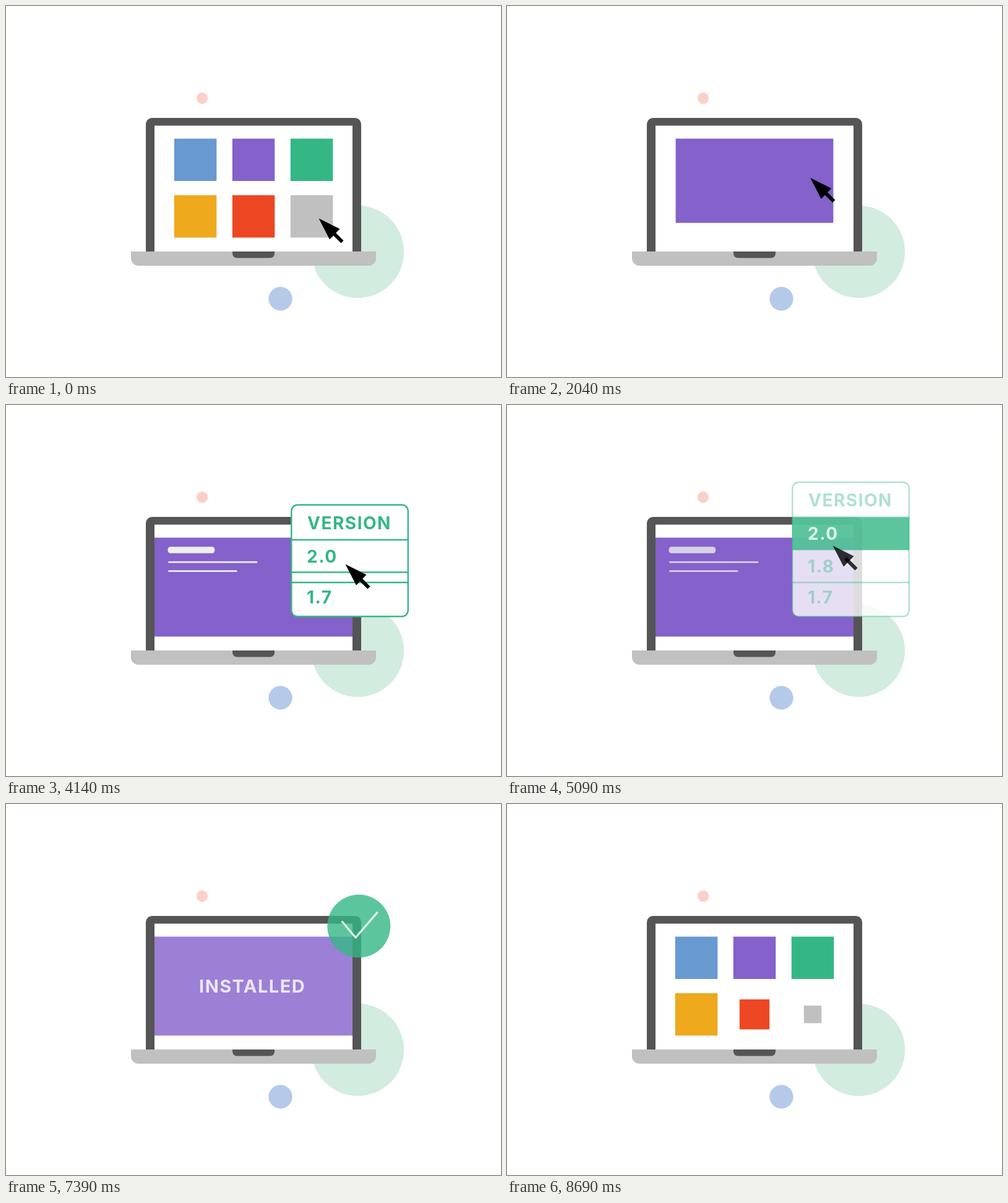
An HTML page with a canvas for the animation above (8840 ms loop, 800x600 px).

```html
<!DOCTYPE html>
<html lang="en">
<head>
<meta charset="utf-8">
<title>Install</title>
<style>
  html, body { margin: 0; width: 100%; height: 100%; overflow: hidden; background: #fff; }
  canvas { display: block; }
</style>
</head>
<body>
<canvas id="stage" width="800" height="600"></canvas>
<script>
const ctx = document.getElementById('stage').getContext('2d');
const LOOP = 8840;
const PURPLE = '#8461cb', GREEN = '#35b785', DARK = '#555', GRAY = '#c0c0c0';
const TILES = ['#6899d0', PURPLE, GREEN, '#eea91d', '#ee4723', GRAY];
const TILE = 68.5;

const clamp = (v, lo = 0, hi = 1) => Math.min(hi, Math.max(lo, v));
const mix = (a, b, p) => a + (b - a) * p;
const smooth = p => p * p * (3 - 2 * p);
// Stepped progress: the first of n equal steps happens at `start`.
const steps = (t, start, gap, n) => clamp(Math.floor((t - start) / gap) + 1, 0, n) / n;

function withAlpha(alpha, draw) {
  if (alpha <= 0) return;
  ctx.save();
  ctx.globalAlpha *= alpha;
  draw();
  ctx.restore();
}

function box(x, y, w, h, color, radius = 0) {
  ctx.fillStyle = color;
  ctx.beginPath();
  ctx.roundRect(x, y, w, h, radius);
  ctx.fill();
}

function disc(x, y, r, color) {
  ctx.fillStyle = color;
  ctx.beginPath();
  ctx.arc(x, y, r, 0, Math.PI * 2);
  ctx.fill();
}

function polyline(points, color, width, cap = 'butt') {
  ctx.strokeStyle = color;
  ctx.lineWidth = width;
  ctx.lineCap = ctx.lineJoin = cap === 'round' ? 'round' : 'miter';
  if (cap === 'butt') ctx.lineCap = 'butt';
  ctx.beginPath();
  points.forEach(([x, y]) => ctx.lineTo(x, y));
  ctx.stroke();
}

function label(text, x, y, color, size = 28) {
  ctx.font = `700 ${size}px Inter, sans-serif`;
  ctx.letterSpacing = '1.5px';
  ctx.fillStyle = color;
  ctx.fillText(text, x, y);
}

function cursor(x, y) {
  ctx.save();
  ctx.translate(x, y);
  polyline([[20, 20], [37.5, 37.5]], '#000', 6);
  ctx.fillStyle = '#000';
  ctx.beginPath();
  [[-0.5, -0.5], [33.5, 16.5], [17, 33.5]].forEach(p => ctx.lineTo(...p));
  ctx.fill();
  ctx.restore();
}

function laptop() {
  disc(568.5, 397.5, 74.7, '#d2ecdf');
  disc(443.5, 473.5, 19.2, '#b4cae8');
  disc(317, 149, 9.2, '#fad0c9');
  box(226, 181, 348, 216, DARK, [10, 10, 0, 0]);
  box(240, 193.5, 320, 203.5, '#fff');
  box(202, 397, 396, 23, GRAY, [0, 0, 12, 12]);
  box(366, 397, 68, 10.5, DARK, [0, 0, 7, 7]);
}

function tile(i, scale = 1) {
  const size = TILE * scale, inset = (TILE - size) / 2;
  box(271.8 + 94 * (i % 3) + inset, (i < 3 ? 214.5 : 306) + inset, size, size, TILES[i]);
}

function tiles(t) {
  if (t < 2540) withAlpha(1 - steps(t, 1740, 100, 4), () => TILES.forEach((_, i) => tile(i)));
  // Tiles pop in one after another before the loop restarts.
  if (t >= 7940) TILES.forEach((_, i) => {
    const k = Math.floor((t - 7940) / 150) - i;
    if (k >= 0) tile(i, Math.min(1, 0.415 + 0.29 * k + (k > 1 ? 0.1 : 0)));
  });
}

function page(t) {
  const open = smooth(steps(t, 1740, 100, 6));
  box(mix(365.8, 240, open), 214.5, mix(TILE, 320, open), mix(TILE, 160, open), PURPLE);
  const shown = steps(t, 2140, 100, 5) * (1 - steps(t, 5090, 100, 5));
  withAlpha(shown, () => {
    box(261.5, 229.3, 75.8, 10.5, '#eee', 4.5);
    box(262, 252.8, 144.5, 2.6, '#eee', 1.3);
    box(262, 267.3, 111.7, 2.6, '#eee', 1.3);
  });
}

function button(t) {
  withAlpha(steps(t, 2140, 100, 5), () => {
    box(460.5, 284.7, 188.5, 57.8, GREEN, 8);
    label('INSTALL', 485, 324, '#fff', 29);
  });
}

const GROWTH = [0, 35.5, 55.5, 87.5, 124, 144.5, 160.5];

// The list grows upwards; each row opens to its full height in turn.
function versionCard(t) {
  const grown = GROWTH[clamp(Math.floor((t - 3540) / 150), 0, 6)];
  const picked = t >= 4590;
  const ink = picked ? 0.5 : 1;
  const top = 285.5 - grown;
  const oldest = Math.min(grown, 55);
  const newest = clamp(grown - 55, 0, 52.5);
  const rows = [['2.0', newest, 16], ['1.8', grown - oldest - newest, 16], ['1.7', oldest, 21]];

  box(461.3, top, 188.5, 342 - top, '#fff', 10);
  withAlpha(ink, () => label('VERSION', 487, top + 39, GREEN));
  let y = top + 56.5;
  rows.forEach(([name, height, pad], i) => {
    if (height < 1) return;
    const chosen = picked && i === 0;
    const bottom = y + height;
    ctx.save();
    ctx.beginPath();
    ctx.rect(461, y, 189, height);
    ctx.clip();
    if (chosen) box(461, y, 189, height, GREEN);
    if (i !== 1 || height > 30)
      withAlpha(chosen ? 1 : ink, () => label(name, 486, bottom - pad, chosen ? '#fff' : GREEN));
    ctx.restore();
    withAlpha(ink, () => polyline([[461, y], [650, y]], GREEN, 2.4));
    y = bottom;
  });
  withAlpha(ink, () => {
    ctx.strokeStyle = GREEN;
    ctx.lineWidth = 2.4;
    ctx.beginPath();
    ctx.roundRect(461.3, top, 188.5, 342 - top, 10);
    ctx.stroke();
  });
}

function done(t) {
  const k = steps(t, 5490, 200, 3);
  if (!k) return;
  withAlpha(k, () => label('INSTALLED', 312, 304.5, '#fff', 29));
  ctx.save();
  ctx.translate(570.3, 197.5);
  ctx.scale(mix(0.25, 1, k), mix(0.25, 1, k));
  disc(0, 0, 51, GREEN);
  polyline([[-26.8, -7], [-5.3, 18.5], [29.7, -22]], '#fff', 3.4, 'round');
  ctx.restore();
}

const PATH = [[619, 314], [608, 305], [608, 305], [571, 276], [549, 258], [534, 246], [527, 228]];

function cursorAt(t) {
  if (t >= 3540) return PATH[clamp(Math.floor((t - 3540) / 150), 0, 6)];
  const a = smooth(steps(t, 1000, 30, 9));
  const b = smooth(steps(t, 1740, 100, 9));
  return [mix(mix(506, 399, a), 619, b), mix(mix(344, 253, a), 314, b)];
}

function draw(t) {
  ctx.fillStyle = '#fff';
  ctx.fillRect(0, 0, 800, 600);
  laptop();
  tiles(t);
  if (t >= 1740) withAlpha(1 - steps(t, 7390, 100, 5), () => {
    page(t);
    done(t);
  });
  withAlpha(1 - steps(t, 5090, 100, 5), () => {
    if (t >= 3540) versionCard(t);
    else button(t);
    cursor(...cursorAt(t));
  });
}

const start = performance.now();
function tick() {
  draw((performance.now() - start) % LOOP);
  requestAnimationFrame(tick);
}
tick();
</script>
</body>
</html>
```
